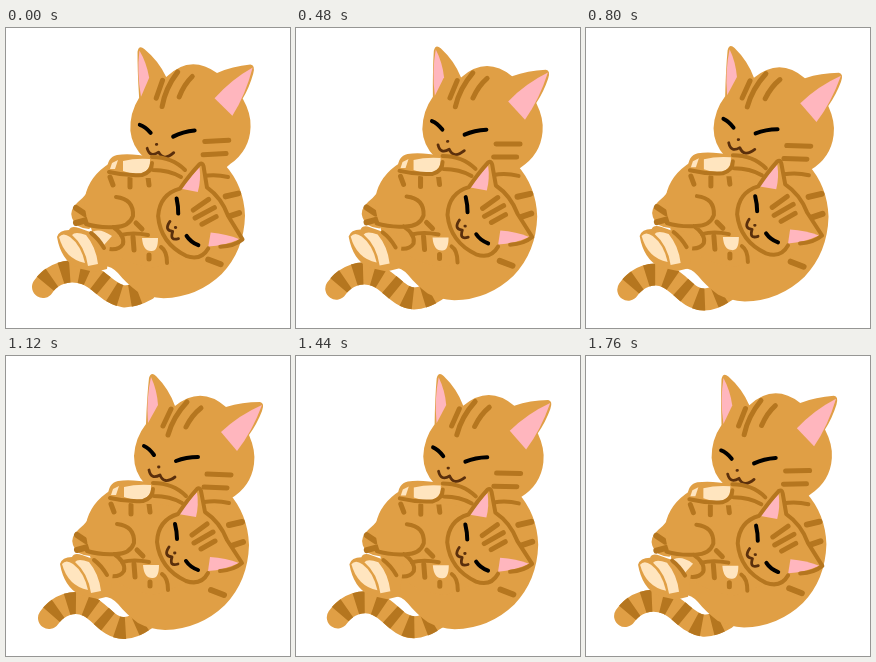
An HTML page for the animation above (1920 ms loop, 284 px wide and 300 px high).

```html
<!DOCTYPE html>
<html lang="en">
<head>
<meta charset="utf-8">
<title>Cuddling cats</title>
<style>
html, body { margin: 0; width: 100%; height: 100%; overflow: hidden; background: #fff; }
svg { display: block; width: 100vw; height: 100vh; }
path { stroke-linecap: round; stroke-linejoin: round; }
.fur { fill: #e09f45; }
.cream { fill: #ffe5bf; }
.pink { fill: #ffb6be; }
.line, .bar, .wide { fill: none; stroke: #b5761f; stroke-width: 4; }
.bar { stroke-width: 5; }
.wide { stroke-width: 6; }
.eye { fill: none; stroke: #000; stroke-width: 4; }
.mouth { fill: none; stroke: #5a2f0c; stroke-width: 2.8; }
.tail { fill: none; stroke: #e09f45; stroke-width: 22; }
.tail + path { fill: none; stroke: #b5761f; stroke-width: 22; stroke-dasharray: 9 10; stroke-dashoffset: -4; stroke-linecap: butt; }
</style>
</head>
<body>
<svg viewBox="0 0 284 300" preserveAspectRatio="none">
  <g id="tail">
    <path class="tail"/>
    <path/>
  </g>

  <g id="body">
    <path class="fur" d="M222 136 Q242 158 243 189 Q242 225 219 249 Q194 273 159 274 Q143 273 132 267 Q120 258 112 248 Q104 239 94 241 L84 200 L110 140Z"/>
    <path class="wide" d="M223 169 L236 166 M219 192 L237 186 M205 234 L218 239"/>
  </g>

  <g id="head">
    <path class="fur" d="M140 68 Q141 40 143 22 Q145 15 150 20 Q163 33 169 50 Q195 29 220 51 Q236 46 254 46 Q259 47 256 55 Q251 68 243 79 Q250 95 248 108 Q245 131 224 143 Q208 156 180 158 Q152 152 139 128 Q128 116 128 100 Q129 82 140 68Z"/>
    <path class="pink" d="M145 21 Q151 34 152 49 L142 67 Q140 43 145 21Z"/>
    <path class="pink" d="M256 49 Q233 59 215 76 L231 95 Q246 76 256 49Z"/>
    <path class="bar" d="M165 53 L157 70 M181 46 Q167 61 162 79 M195 52 Q186 59 180 71 M201 118 L225 119 M198 131 L221 132"/>
    <g id="face">
      <path class="eye" d="M138 90 Q143 92 148 99 M170 105 Q180 101 192 101"/>
      <path class="mouth" d="M152.500 111 L153 111 M143 114 Q145 124 154 119 Q158 129 169 121"/>
    </g>
  </g>

  <g id="kit">
    <path class="fur" d="M81 165 Q78 169 73 173 Q64 181 67 189 Q70 199 84 200 L106 182Z"/>
    <path class="wide" d="M71 179 L80 185 M71 194 L82 191"/>
    <path class="fur" d="M105 134 Q84 147 80 168 Q78 196 97 211 Q113 236 150 239 L184 226 L173 151 L144 143Z"/>
    <path class="line" d="M111 168 Q129 170 128 187 Q124 198 110 198 Q94 199 81 195 M108 198 Q120 206 118 215 Q113 223 99 219"/>
    <path class="bar" d="M105 148 L108 156 M125 149 L125 158 M143 148 L144 156 M131 194 L137 200 M128 208 L129 221 M144 226 L144 230"/>
    <path class="line" d="M116 206 Q128 203 143 206 M156 218 Q162 222 162 234"/>
    <path class="cream" d="M137 209 L153 209 Q153 223 146 222 Q138 222 137 209Z"/>
  </g>

  <g id="feet">
    <path class="fur" d="M54 208 Q56 201 66 201 Q68 196 76 199 L90 204 Q101 201 108 209 L104 240 L92 243 L74 239 Q58 231 54 208Z"/>
    <path class="cream" d="M56 208 Q60 203 67 208 Q78 216 82 234 Q62 230 56 208Z"/>
    <path class="cream" d="M69 206 Q72 202 83 206 Q93 218 95 235 L85 237 Q82 217 69 206Z"/>
    <path id="toe" class="cream" d="M86 205 Q95 197 109 207 L101 216 Q95 208 86 205Z"/>
    <path class="line" d="M88 204 Q95 209 101 219"/>
  </g>

  <g id="arm">
    <path class="fur" d="M102 141 Q102 127 112 125 Q126 123 146 127 Q168 126 180 140 L178 156 Q161 147 143 148 Q121 149 102 141Z"/>
    <path class="cream" d="M118 131 Q130 128 145 129 Q146 139 138 143 Q128 145 118 141Z"/>
    <path class="cream" d="M107 133 L113 130 L110 139 L105 139Z"/>
    <path class="line" d="M104 142 Q121 146 137 145 Q147 142 147 133 M147 127 Q167 127 180 140 M148 140 Q164 140 176 147 M198 146 Q211 144 223 147"/>
  </g>

  <g id="kitHead">
    <path class="fur" d="M202 216 Q195 230 180 225 Q154 213 151 186 Q152 164 172 158 Q182 143 191 133 Q194 131 195 135 L199 156 Q214 166 221 184 L237 207 Q228 214 202 216Z"/>
    <path class="pink" d="M191 136 Q181 147 172 158 L190 161 Q193 149 191 136Z"/>
    <path class="pink" d="M204 201 Q220 202 233 207 Q218 214 202 215Z"/>
    <path class="line" d="M202 217 Q195 230 180 225 Q154 213 151 186 Q152 164 172 158 Q182 143 191 133 Q194 131 195 135 L199 156 Q214 166 221 184 L236 207 Q228 214 214 215"/>
    <path class="bar" d="M186 179 L201 168 M188 187 L207 176 M195 193 L209 185"/>
    <path class="eye" d="M169 168 Q171 176 171 183 M180 205 Q184 211 192 214"/>
    <path class="mouth" d="M168.500 197 L169 197 M163 191 Q157 200 166 201 Q163 211 172 208"/>
  </g>
</svg>
<script>
const STEP = 160;
const sway = [0, .05, .35, .55, .8, .88, .97, 1, .88, .8, .55, .35];
const $ = id => document.getElementById(id);
const move = (id, value) => $(id).setAttribute("transform", value);

// Tail spine at both ends of the sway
const tailUp = [37, 259, 46, 245, 64, 240, 80, 246, 94, 251, 102, 266, 118, 268.5, 126, 268, 133, 266, 140, 262];
const tailDown = [43, 262, 52, 249, 68, 243, 82, 250, 96, 257, 102, 272, 118, 272, 126, 272, 133, 268, 140, 263];

function tailPath(p) {
  const v = tailUp.map((a, i) => (a + (tailDown[i] - a) * p).toFixed(2));
  return `M${v.slice(0, 2)} C${v.slice(2)}`;
}

// Shapes are drawn fully leaned (p = 1); q is how far they lean back
function pose(p) {
  const q = 1 - p;
  const d = tailPath(p);
  for (const path of $("tail").children) path.setAttribute("d", d);
  move("body", `translate(110 150) scale(${1 - .03 * q}) translate(-110 -150)`);
  move("head", `rotate(${-5.7 * q} 155 138)`);
  move("face", `translate(0 ${5 * q})`);
  move("kit", `translate(${-q} ${q})`);
  move("feet", `translate(${-3 * q} ${q})`);
  $("toe").setAttribute("visibility", p < .5 ? "visible" : "hidden");
  move("arm", `translate(${-q} ${2 * q})`);
  move("kitHead", `translate(${q} ${3 * q}) rotate(${1.6 * q} 186 190)`);
}

function draw(now) {
  pose(sway[Math.floor(now / STEP) % sway.length]);
  requestAnimationFrame(draw);
}
draw(performance.now());
</script>
</body>
</html>
```
